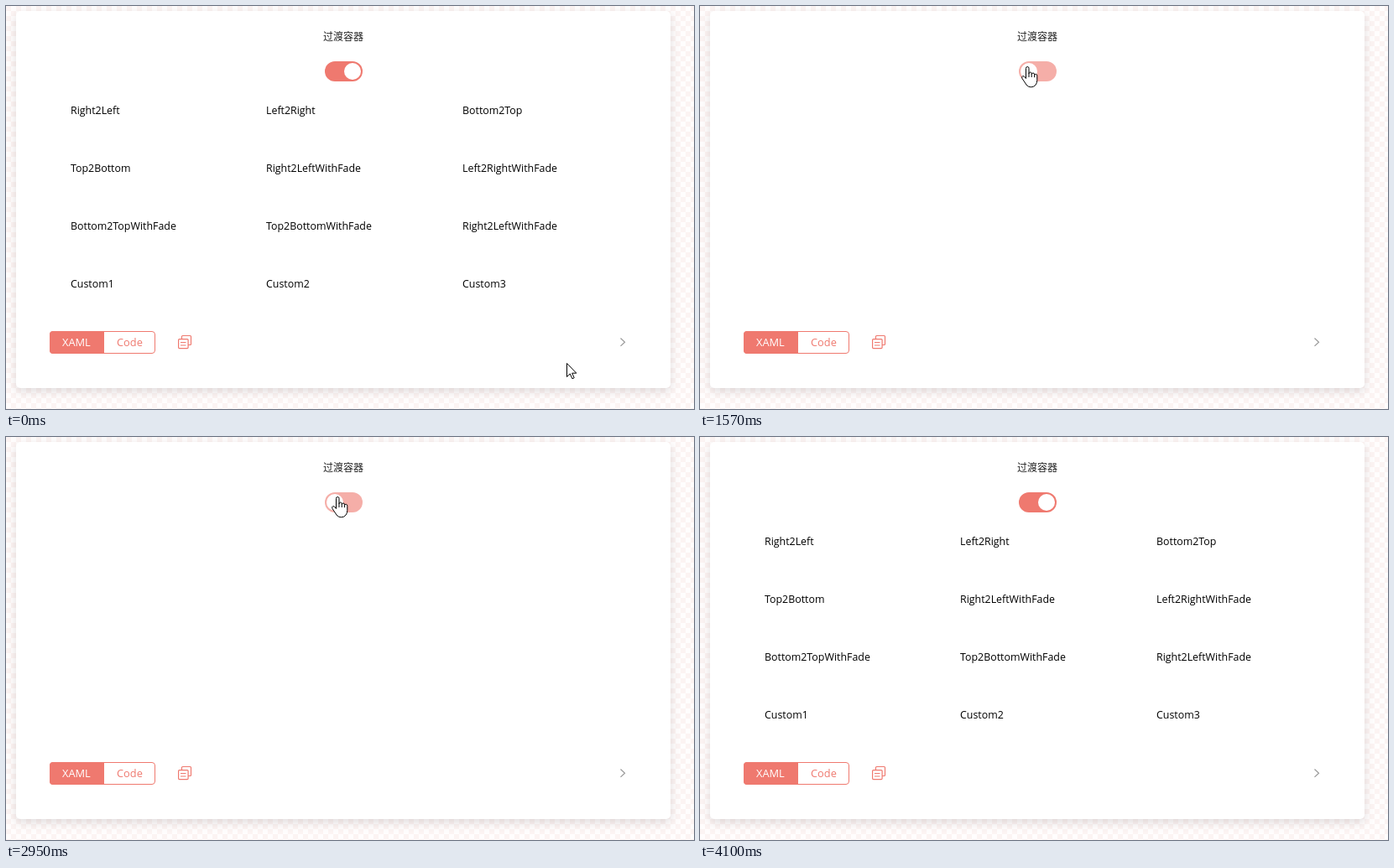
An HTML page that plays this animation: 820x481 px, repeating every 4500 ms.

```html
<!DOCTYPE html>
<html lang="zh-CN">
<head>
<meta charset="utf-8">
<title>Transition container</title>
<style>
  html, body { margin: 0; width: 100%; height: 100%; overflow: hidden; background: #fffdfd; }
  svg { display: block; width: 820px; height: 481px; font-family: "Open Sans", "Noto Sans", sans-serif; }
  .card { fill: #fff; filter: drop-shadow(0 4px 6px rgba(60, 50, 55, .16)); }
  .title { font: 12px "Noto Sans CJK SC", "Noto Sans CJK", sans-serif; fill: #212121; }
  .labels { font-size: 12.4px; }
  .tabs { font-size: 12.8px; }
  .line { fill: none; stroke: #ef796f; stroke-width: 1.2; }
  .accent { fill: #ef796f; }
  .cursor { fill: #fff; stroke: #000; stroke-linejoin: round; }
</style>
</head>
<body>
<svg viewBox="0 0 820 481">
  <defs>
    <pattern id="dots" width="12" height="12" patternUnits="userSpaceOnUse">
      <path d="M0 0h6v6h-6zM6 6h6v6h-6z" fill="#fcf4f3"/>
    </pattern>
  </defs>
  <rect width="820" height="481" fill="url(#dots)"/>
  <rect class="card" x="12" y="6" width="780" height="450" rx="5"/>
  <text class="title" x="378" y="41">过渡容器</text>

  <rect id="pill" class="accent" x="380" y="66" width="45" height="24" rx="12"/>
  <rect id="thumb" y="68" height="20" rx="10" fill="#fff"/>

  <g id="labels" class="labels"></g>

  <g class="tabs">
    <rect class="line" x="52.5" y="388.5" width="125" height="26" rx="3.5" style="stroke-width:1"/>
    <path class="accent" d="M117 388H56a4 4 0 0 0-4 4v19a4 4 0 0 0 4 4h61z"/>
    <text x="67" y="406" fill="#fff">XAML</text>
    <text x="132" y="406" class="accent">Code</text>
  </g>
  <g class="line">
    <rect x="205.6" y="397.6" width="11.5" height="11" rx="1"/>
    <path d="M209.5 397.5V394.5a1 1 0 0 1 1-1h9a1 1 0 0 1 1 1v9a1 1 0 0 1-1 1h-2.5M208 401.5h6.5M208 405h6.5"/>
  </g>
  <path d="M732.5 396.5l5 4.7-5 4.7" fill="none" stroke="#999" stroke-width="1.2"/>

  <circle id="press" r="12" fill="#ff0" fill-opacity=".47"/>
  <g id="cursor" class="cursor">
    <path id="arrow" d="M.5.5V16.6L4.3 13 6.9 18.8 9.2 17.8 6.7 12.2H11.8Z"/>
    <g id="hand">
      <path d="M-1.5 13.5V1.5Q-1.5-.5.3-.5T2 1.5V8Q2 6 3.6 6T5.2 7.8V8.6Q5.4 7 7 7T8.6 8.8V9.6Q8.9 8.2 10.3 8.3T11.8 10.2V15.5Q11.8 19 10 21.2 8 23.8 4.5 23.8 1 23.8-1 21L-6 13.5Q-7 11.5-5.3 10.6-3.8 10-1.5 13.5Z"/>
      <path d="M2 8v4M5.2 8.6v3.4M8.6 9.6v2.6"/>
    </g>
  </g>
</svg>
<script>
const LOOP = 4500, TICK = 77.4, JITTER = 12;
const $ = id => document.getElementById(id);
const clamp = v => Math.min(1, Math.max(0, v));
const mix = (a, b, k) => a + (b - a) * k;

// Remaining distance of each easing, 1 at the start and 0 at the end
const cubic = p => (1 - p) ** 3;
const elastic = p => {
  const q = 1 - p;
  return (Math.exp(3 * q) - 1) / (Math.exp(3) - 1) * Math.sin(2.5 * Math.PI * q);
};

const slide = (dx, dy) => p => `translate(${dx * 50 * cubic(p)} ${dy * 50 * cubic(p)})`;
const fromRight = slide(1, 0), fromLeft = slide(-1, 0);
const fromBottom = slide(0, 1), fromTop = slide(0, -1);
const bounce = p => `translate(${50 * elastic(p)} 0)`;
const swing = p => `rotate(${10 * elastic(p)} 412 332)`;
const zoom = p => `translate(646 332) scale(${1 - .17 * elastic(p)}) translate(-646 -332)`;

const labels = [
  ["Right2Left", fromRight], ["Left2Right", fromLeft], ["Bottom2Top", fromBottom],
  ["Top2Bottom", fromTop], ["Right2LeftWithFade", fromRight], ["Left2RightWithFade", fromLeft],
  ["Bottom2TopWithFade", fromBottom], ["Top2BottomWithFade", fromTop], ["Right2LeftWithFade", fromRight],
  ["Custom1", bounce], ["Custom2", swing], ["Custom3", zoom]
].map(([name, move], i) => {
  const el = document.createElementNS("http://www.w3.org/2000/svg", "text");
  el.textContent = name;
  el.setAttribute("x", [77, 310, 544][i % 3]);
  el.setAttribute("y", 129 + 69 * Math.floor(i / 3));
  $("labels").append(el);
  return { el, move, fade: name.endsWith("Fade") };
});

// Toggle clicks: start, duration, new state
const clicks = [[-1000, 490, 1], [770, 390, 0], [1604, 490, 1], [2545, 390, 0], [3285, 490, 1]];
const presses = [[460, 690], [1620, 1700], [2395, 2550], [3325, 3400]];

// Pointer path: time, x, y
const path = [
  [0, 668, 426], [464, 387, 65], [541, 384, 73], [1470, 384, 73], [1625, 395, 73],
  [1703, 395, 72], [3405, 395, 72], [3638, 409, 76], [3715, 545, 220],
  [3792, 725, 422], [4024, 745, 470], [4101, 752, 500], [LOOP + TICK, 752, 500]
];

function pointer(t) {
  const i = path.findIndex(p => p[0] > t);
  const [t0, x0, y0] = path[i - 1], [t1, x1, y1] = path[i];
  let k = (t - t0) / (t1 - t0);
  if (i === 1) k = k * k * (3 - 2 * k);
  return [Math.round(mix(x0, x1, k)), Math.round(mix(y0, y1, k))];
}

function drawToggle(p, on) {
  const lead = 1 - (1 - p) ** 5;
  const left = on ? mix(382, 403, p) : mix(403, 382, lead);
  const right = on ? mix(402, 423, lead) : mix(423, 402, p);
  $("thumb").setAttribute("x", left);
  $("thumb").setAttribute("width", right - left);
  $("pill").setAttribute("fill-opacity", on ? mix(.6, 1, p) : mix(1, .6, p));
}

function drawLabels(p, on) {
  $("labels").style.display = on ? "" : "none";
  for (const { el, move, fade } of labels) {
    el.setAttribute("transform", move(p));
    el.setAttribute("opacity", fade ? p : 1);
  }
}

function drawPointer(t) {
  const [x, y] = pointer(t);
  const over = x >= 380 && x <= 425 && y >= 64 && y <= 91;
  const at = `translate(${x} ${y})`;
  $("cursor").setAttribute("transform", at);
  $("press").setAttribute("transform", at);
  $("hand").style.display = over ? "" : "none";
  $("arrow").style.display = over ? "none" : "";
  $("press").style.display = presses.some(([a, b]) => t >= a && t < b) ? "" : "none";
}

function draw(now) {
  const t = Math.floor((now % LOOP + JITTER) / TICK) * TICK;
  const [start, time, on] = clicks.filter(c => c[0] <= t).pop();
  const p = clamp((t - start) / time);
  drawToggle(p, on);
  drawLabels(p, on);
  drawPointer(t);
}

const begin = performance.now();
function frame() {
  draw(performance.now() - begin);
  requestAnimationFrame(frame);
}
frame();
</script>
</body>
</html>
```
